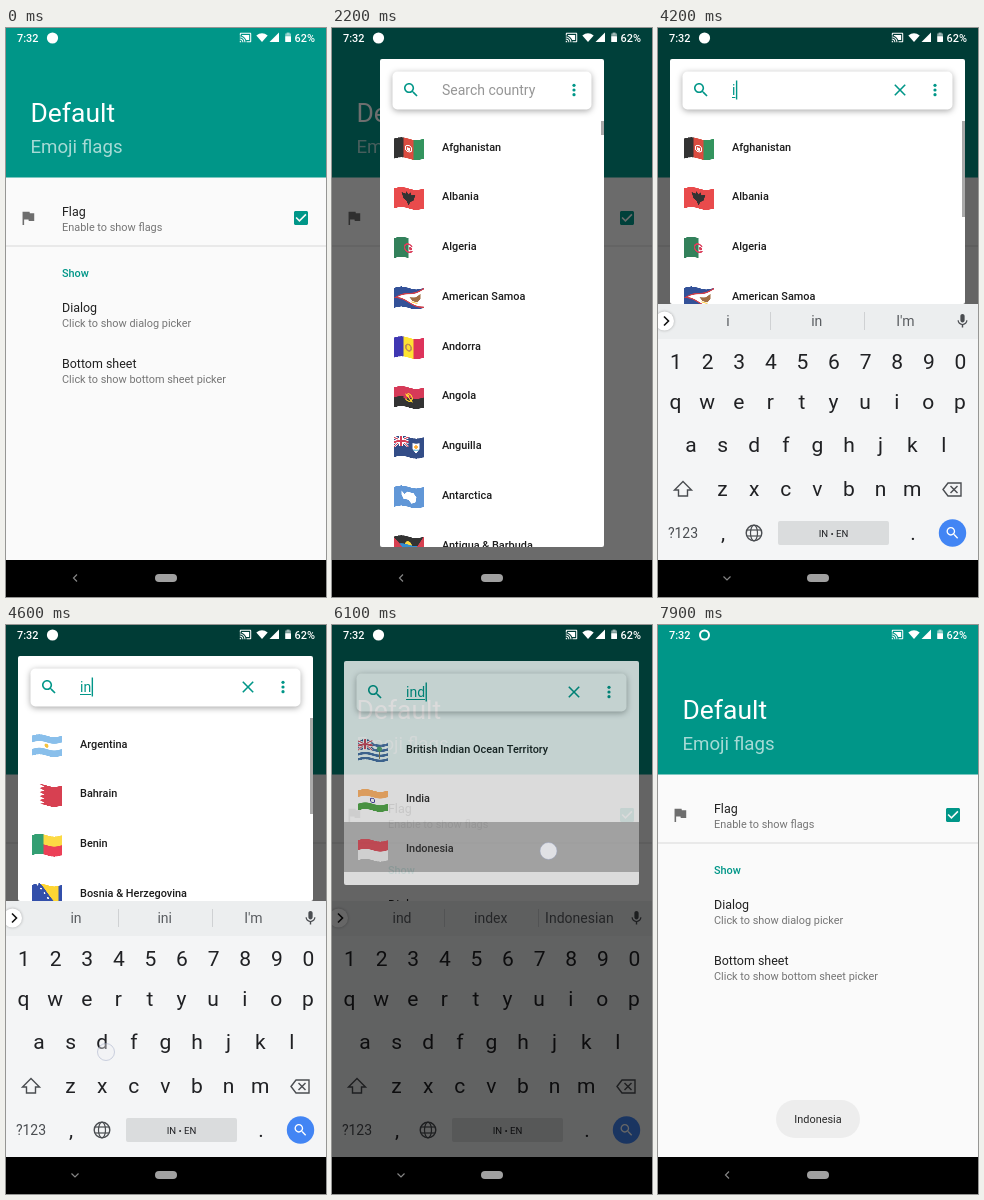
Animation, 320 px wide and 569 px high, one loop 8 s. Source, as an HTML page with a canvas:

```html
<!DOCTYPE html>
<html lang="en">
<head>
<meta charset="utf-8">
<title>Country picker</title>
<style>
html, body { margin: 0; width: 100%; height: 100%; overflow: hidden; background: #000; }
canvas { display: block; width: 320px; height: 569px; }
</style>
</head>
<body>
<canvas></canvas>
<script>
const W = 320, H = 569, LOOP = 8000, TEAL = '#009688';
const dpr = window.devicePixelRatio || 1;

function surface(w, h, scale, canvas = document.createElement('canvas')) {
  canvas.width = Math.round(w * scale);
  canvas.height = Math.round(h * scale);
  const ctx = canvas.getContext('2d');
  ctx.scale(scale, scale);
  return ctx;
}
const screen2d = surface(W, H, dpr, document.querySelector('canvas'));
const buffer = surface(W, H, dpr);
let g = screen2d, t = 0;

// --- helpers -------------------------------------------------------------
const ramp = (a, b) => Math.min(1, Math.max(0, (t - a) / (b - a)));
const during = (a, b) => t >= a && t < b;

function rect(x, y, w, h, color, r = 0) {
  g.fillStyle = color;
  g.beginPath();
  g.roundRect(x, y, w, h, r);
  g.fill();
}
function disc(x, y, r, color) {
  g.fillStyle = color;
  g.beginPath();
  g.arc(x, y, r, 0, 7);
  g.fill();
}
function trace(pts, close) {
  g.beginPath();
  for (let i = 0; i < pts.length; i += 2) g.lineTo(pts[i], pts[i + 1]);
  if (close) g.closePath();
}
function poly(color, ...pts) {
  trace(pts);
  g.fillStyle = color;
  g.fill();
}
function line(color, width, pts, close) {
  trace(pts, close);
  g.strokeStyle = color;
  g.lineWidth = width;
  g.stroke();
}
function ring(x, y, rx, ry, color, width) {
  g.strokeStyle = color;
  g.lineWidth = width;
  g.beginPath();
  g.ellipse(x, y, rx, ry, 0, 0, 7);
  g.stroke();
}
function text(s, x, y, size, color, weight = 400, align = 'left') {
  g.font = `${weight} ${size}px Roboto, sans-serif`;
  g.textAlign = align;
  g.fillStyle = color;
  g.fillText(s, x, y);
}
function icon(path, cx, cy, color, size = 18.67) {
  g.save();
  g.translate(cx - size / 2, cy - size / 2);
  g.scale(size / 24, size / 24);
  g.fillStyle = color;
  g.fill(new Path2D(path));
  g.restore();
}
function clipped(x, y, w, h, paint) {
  g.save();
  g.beginPath();
  g.rect(x, y, w, h);
  g.clip();
  paint();
  g.restore();
}
// Paints a group and blends it as one sheet.
function layer(alpha, paint, dy = 0, scale = 1) {
  if (alpha <= 0) return;
  const below = g;
  g = buffer;
  g.clearRect(0, 0, W, H);
  paint();
  g = below;
  g.save();
  g.globalAlpha = alpha;
  g.translate(W / 2, H / 2 + dy);
  g.scale(scale, scale);
  g.drawImage(buffer.canvas, -W / 2, -H / 2, W, H);
  g.restore();
}
function ripple(x, y, w, h, cx, cy, p, alpha) {
  clipped(x, y, w, h, () => {
    rect(x, y, w, h, `rgba(0,0,0,${alpha * 0.35 * p})`);
    disc(cx, cy, 20 + 300 * p, `rgba(0,0,0,${alpha * 0.7})`);
  });
}

const ICON = {
  flag: 'M14.4 6L14 4H5v17h2v-7h5.6l.4 2h7V6z',
  check: 'M19 3H5c-1.11 0-2 .9-2 2v14c0 1.1.89 2 2 2h14c1.11 0 2-.9 2-2V5c0-1.1-.89-2-2-2zm-9 14l-5-5 1.41-1.41L10 14.17l7.59-7.59L19 8l-9 9z',
  search: 'M15.5 14h-.79l-.28-.27C15.41 12.59 16 11.11 16 9.5 16 5.91 13.09 3 9.5 3S3 5.91 3 9.5 5.91 16 9.5 16c1.61 0 3.09-.59 4.23-1.57l.27.28v.79l5 4.99L20.49 19l-4.99-5zm-6 0C7.01 14 5 11.99 5 9.5S7.01 5 9.5 5 14 7.01 14 9.5 11.99 14 9.5 14z',
  mic: 'M12 14c1.66 0 3-1.34 3-3V5c0-1.66-1.34-3-3-3S9 3.34 9 5v6c0 1.66 1.34 3 3 3zm5.3-3c0 3-2.54 5.1-5.3 5.1S6.7 14 6.7 11H5c0 3.41 2.72 6.23 6 6.72V21h2v-3.28c3.28-.48 6-3.3 6-6.72h-1.7z',
  cast: 'M21 3H3c-1.1 0-2 .9-2 2v3h2V5h18v14h-7v2h7c1.1 0 2-.9 2-2V5c0-1.1-.9-2-2-2zM1 18v3h3c0-1.66-1.34-3-3-3zm0-4v2c2.76 0 5 2.24 5 5h2c0-3.87-3.13-7-7-7zm0-4v2c4.97 0 9 4.03 9 9h2c0-6.08-4.93-11-11-11zM19 7H5v1.6c4 1.3 7.1 4.4 8.4 8.4H19z'
};

// --- flags, drawn flat on 30 x 20 and then waved --------------------------
const columns = (...c) => c.forEach((k, i) => rect(i * 30 / c.length, 0, 30 / c.length + 0.1, 20, k));
const rows = (...c) => c.forEach((k, i) => rect(0, i * 20 / c.length, 30, 20 / c.length + 0.1, k));
function ensign() {
  clipped(0, 0, 15, 10, () => {
    rect(0, 0, 15, 10, '#012169');
    for (const [c, w] of [['#fff', 2.4], ['#c8102e', 0.9]]) {
      line(c, w, [0, 0, 15, 10]);
      line(c, w, [0, 10, 15, 0]);
    }
    for (const [c, w] of [['#fff', 3.6], ['#c8102e', 2]]) {
      line(c, w, [7.5, 0, 7.5, 10]);
      line(c, w, [0, 5, 15, 5]);
    }
  });
}
const FLAGS = {
  'Afghanistan'() { columns('#000', '#d32011', '#007a36'); ring(15, 10, 3.2, 3.2, '#fff', 1); rect(13.7, 9, 2.6, 3, '#fff'); },
  'Albania'() {
    rows('#e41e20');
    poly('#000', 15, 6, 17, 3.5, 18, 6, 22, 5, 20, 11, 17, 13, 15, 17, 13, 13, 10, 11, 8, 5, 12, 6, 13, 3.5);
  },
  'Algeria'() { columns('#006233', '#fff'); ring(15, 10, 4, 4, '#d21034', 1.5); rect(17, 8, 4, 4, '#fff'); disc(17, 10, 1.6, '#d21034'); },
  'American Samoa'() {
    rows('#00267f');
    poly('#bd1021', 30, 0, 0, 10, 30, 20);
    poly('#fff', 30, 1.5, 4, 10, 30, 18.5);
    poly('#8a4b16', 16, 9, 22, 8, 27, 5, 27, 10, 24, 13, 19, 12);
    line('#ffc221', 1, [18, 13, 24, 14]);
  },
  'Andorra'() { columns('#10069f', '#fedd00', '#d50032'); ring(15, 10, 2.7, 3.2, '#b5742a', 1.5); },
  'Angola'() { rows('#cc092f', '#000'); ring(15, 10, 3.7, 3.7, '#ffcb00', 1.1); rect(10, 6, 4, 6, '#cc092f'); line('#ffcb00', 1.2, [12, 7, 19, 14]); disc(14, 8.5, 1.4, '#ffcb00'); },
  'Anguilla'() { rows('#012169'); ensign(); poly('#fff', 19, 5, 26, 5, 26, 11, 22.5, 15, 19, 11); disc(22.5, 8.5, 1.8, '#ff9800'); rect(20, 11, 5, 1.5, '#5bb8d4'); },
  'Antarctica'() { rows('#3a7dce'); poly('#fff', 8, 5, 11, 8, 14, 5, 20, 5, 23, 9, 22, 14, 18, 16, 15, 13, 10, 13, 8, 9); },
  'Antigua & Barbuda'() {
    rows('#000', '#000', '#0072c6', '#fff', '#fff');
    disc(15, 8, 3.3, '#fcd116');
    rect(9, 8, 12, 4, '#0072c6');
    poly('#ce1126', 0, 0, 15, 20, 0, 20);
    poly('#ce1126', 30, 0, 15, 20, 30, 20);
  },
  'Argentina'() { rows('#6cb0e6', '#fff', '#6cb0e6'); disc(15, 10, 2, '#f6b40e'); },
  'Bahrain'() {
    rows('#ce1126');
    const teeth = [0, 0];
    for (let i = 0; i <= 10; i++) teeth.push(i % 2 ? 13 : 8, i * 2);
    poly('#fff', ...teeth, 0, 20);
  },
  'Benin'() { rows('#fcd116', '#e8112d'); rect(0, 0, 12, 20, '#008751'); },
  'Bosnia & Herzegovina'() {
    rows('#002395');
    poly('#fecb00', 9, 0, 27, 0, 27, 20);
    for (let i = 0; i < 6; i++) disc(6 + i * 3.5, 1 + i * 3.9, 0.9, '#fff');
  },
  'British Indian Ocean Territory'() {
    rows('#fff', '#234a91', '#fff', '#234a91', '#fff', '#234a91', '#fff', '#234a91');
    ensign();
    line('#7a5a2c', 1.2, [22, 8, 22, 17]);
    disc(22, 7, 2.6, '#2e8b4a');
  },
  'India'() { rows('#ff9933', '#fff', '#138808'); ring(15, 10, 2.2, 2.2, '#000080', 0.8); },
  'Indonesia'() { rows('#e32636', '#fff'); }
};
const waved = {};
for (const name in FLAGS) {
  const flat = g = surface(30, 20, 4);
  FLAGS[name]();
  const out = waved[name] = surface(30, 23, 4);
  for (let x = 0; x < 30; x += 0.5) {
    const y = 1.5 - 1.4 * Math.sin(x / 30 * 2 * Math.PI);
    out.drawImage(flat.canvas, x * 4, 0, 2, 80, x, y, 0.5, 20);
  }
}

const ALL = Object.keys(FLAGS).slice(0, 9);
const LIST_IN = ['Argentina', 'Bahrain', 'Benin', 'Bosnia & Herzegovina'];
const LIST_IND = ['British Indian Ocean Territory', 'India', 'Indonesia'];

// --- screens ---------------------------------------------------------------
function home() {
  rect(0, 0, W, 532, '#fafafa');
  rect(0, 0, W, 149.5, TEAL);
  text('Default', 24.5, 93.5, 26.45, '#fff');
  text('Emoji flags', 24.5, 124.5, 18.67, 'rgba(255,255,255,.65)');
  icon(ICON.flag, 22, 190, '#6e6e6e');
  icon(ICON.check, 295, 190, TEAL);
  rect(0, 217.5, W, 1, '#d9d9d9');
  text('Show', 56, 248.5, 10.9, TEAL, 500);
  if (during(1200, 2200)) ripple(0, 258, W, 56.5, 160, 286, ramp(1100, 1600), 0.145);
  const items = [['Flag', 'Enable to show flags', 188], ['Dialog', 'Click to show dialog picker', 284],
    ['Bottom sheet', 'Click to show bottom sheet picker', 340.3]];
  for (const [title, hint, y] of items) {
    text(title, 56, y, 12.45, '#212121');
    text(hint, 56, y + 15, 10.9, '#757575');
  }
}

function dialog(x, y, w, h, list, query) {
  rect(x, y, w, h, '#fff', 2);
  g.save();
  g.shadowColor = 'rgba(0,0,0,.35)';
  g.shadowBlur = 6 * dpr;
  g.shadowOffsetY = 1.5 * dpr;
  rect(x + 12.5, y + 12.5, w - 25, 38, '#fff', 5);
  g.restore();

  const mid = y + 31, left = x + 62;
  icon(ICON.search, x + 31, mid, TEAL);
  for (const d of [-4.7, 0, 4.7]) disc(x + w - 30, mid + d, 1.6, TEAL);
  let caret = left + 0.5;
  if (query) {
    text(query, left, mid + 5, 14, TEAL);
    const width = g.measureText(query).width;
    rect(left, mid + 7, width, 1, TEAL);
    caret = left + width + 0.5;
    const cx = x + w - 65;
    line(TEAL, 1.6, [cx - 5.2, mid - 5.2, cx + 5.2, mid + 5.2]);
    line(TEAL, 1.6, [cx - 5.2, mid + 5.2, cx + 5.2, mid - 5.2]);
  } else text('Search country', left, mid + 5, 14, '#969696');
  if (t >= 3200 && !during(5300, 5800)) rect(caret, mid - 9.5, 1.4, 19, TEAL);

  clipped(x, y + 56, w, h - 56, () => {
    if (list === LIST_IND && t >= 5700) ripple(x, y + 161, w, 50, 216, 226, ramp(5600, 6000), 0.3);
    list.forEach((name, i) => {
      const cy = y + 87.7 + i * 49.75;
      g.globalAlpha = 0.8;
      g.drawImage(waved[name].canvas, x + 13.5, cy - 9.5, 30, 23);
      g.globalAlpha = 1;
      text(name, left, cy + 3.9, 10.9, '#1c1c1c', 500);
    });
    if (list !== LIST_IND) rect(x + w - 3, y + 62, 3, query ? 96 : 14, '#aaa');
  });
}

function picker() {
  if (t < 4100) dialog(48, 31, 224, 488, ALL, '');
  else if (t < 4400) dialog(12, 31, 295, 245, ALL, 'i');
  else if (t < 4900) dialog(12, 31, 295, 245, LIST_IN, t < 4800 ? 'in' : 'ind');
  else dialog(12, 36, 295, 224, LIST_IND, 'ind');
}

function keyboard() {
  const ink = '#202124', grey = '#4a4d51';
  rect(0, 276, W, 293, '#f4f5f6');
  rect(0, 276, W, 35, '#eceeef');
  g.save();
  g.shadowColor = 'rgba(0,0,0,.3)';
  g.shadowBlur = 3 * dpr;
  disc(6.5, 293, 9.5, '#fff');
  g.restore();
  line('#111', 1.6, [6, 288.5, 10.5, 293, 6, 297.5]);
  const words = t < 4100 ? ['ini', 'di', 'saya'] : t < 4400 ? ['i', 'in', "I'm"]
    : t < 4800 ? ['in', 'ini', "I'm"] : ['ind', 'index', 'Indonesian'];
  words.forEach((s, i) => text(s, 70 + i * 88.7, 298, 14, '#5a5d61', 400, 'center'));
  for (const x of [112, 206]) rect(x, 284, 1, 18, '#cfd1d3');
  icon(ICON.mic, 304.5, 293, grey, 17);

  const keys = [['1234567890', 18, 340.5], ['qwertyuiop', 17.5, 380.5], ['asdfghjkl', 33, 424], ['zxcvbnm', 64.5, 468]];
  for (const [row, x, y] of keys)
    [...row].forEach((c, i) => text(c, x + i * 31.6, y, 21, ink, 400, 'center'));

  line(grey, 1.4, [25, 453.5, 33.5, 462, 29.5, 462, 29.5, 468, 20.5, 468, 20.5, 462, 16.5, 462], true);
  line(grey, 1.4, [285, 461.5, 290, 455, 303, 455, 303, 468, 290, 468], true);
  line(grey, 1.4, [292.5, 458, 299.5, 465]);
  line(grey, 1.4, [292.5, 465, 299.5, 458]);
  text('?123', 25, 510, 14, grey, 400, 'center');
  text(',', 65, 512, 21, ink, 400, 'center');
  text('.', 255, 512, 21, ink, 400, 'center');
  ring(96, 505, 7.8, 7.8, grey, 1.4);
  ring(96, 505, 3.5, 7.8, grey, 1.2);
  for (const y of [502, 508]) line(grey, 1.2, [89, y, 103, y]);
  rect(120, 493, 111, 24, '#dadcdd', 2);
  text('IN • EN', 175.5, 508.5, 9.6, ink, 400, 'center');
  disc(294.5, 505, 13.7, '#4285f4');
  icon(ICON.search, 294.5, 505, '#fff', 16);
}

function dim(alpha) {
  rect(0, 0, W, 532, `rgba(0,0,0,${alpha})`);
}

function statusBar() {
  text('7:32', 11, 13.8, 10.9, '#fff', 500);
  const solid = t < 1000 || during(2000, 3100) || during(4000, 5000) || during(6000, 7100);
  if (solid) disc(46.5, 10, 5.6, '#fff');
  else ring(46.5, 10, 4.5, 4.5, '#fff', 2);
  icon(ICON.cast, 239.5, 9.5, '#fff', 12.5);
  g.fillStyle = '#fff';
  g.fill(new Path2D('M256 14L250.300 7.500Q256 3 261.700 7.500Z'));
  poly('#fff', 263.5, 14, 273, 4.5, 273, 14);
  rect(280.6, 4.5, 3, 2, 'rgba(255,255,255,.5)');
  rect(279.2, 5.5, 5.8, 3.4, 'rgba(255,255,255,.5)');
  rect(279.2, 8.2, 5.8, 5.8, '#fff', 0.6);
  text('62%', 288.5, 13.8, 10.9, '#fff', 500);
}

function navKeys() {
  const typing = during(3500, 6300);
  line('#858585', 1.2, typing ? [65.5, 548.5, 69, 552, 72.5, 548.5] : [71, 546.5, 67.5, 550, 71, 553.5]);
  rect(149, 546, 22, 8, '#a0a0a0', 4);
}

function pointer() {
  const touches = [[1200, 1300, 160, 286], [3100, 3300, 150, 62], [4000, 4100, 239, 374],
    [4300, 4400, 223, 461], [4500, 4700, 100, 427], [5600, 6200, 216.5, 226]];
  for (const [a, b, x, y] of touches) if (during(a, b)) {
    disc(x, y, 8.5, `rgba(240,241,246,${a === 5600 ? 0.8 : 0.4})`);
    ring(x, y, 8.5, 8.5, 'rgba(150,160,190,.45)', 1);
  }
}

function toast() {
  rect(118, 475, 84, 38, '#ededed', 19);
  text('Indonesia', 160, 498, 10.9, '#2a2a2a', 400, 'center');
}

function draw() {
  const opened = ramp(1900, 2200), closing = ramp(6100, 6400);
  const keysIn = ramp(3300, 3800), keysOut = ramp(6100, 6400);
  const showKeys = () => layer(Math.min(1, keysIn * 1.28) * (1 - keysOut), () => {
    clipped(0, 276, W, 256, keyboard);
  }, 55 * (1 - keysIn) + 55 * keysOut);
  const shade = (t < 4000 ? 0.57 : 0.6) * opened * (1 - closing);

  rect(0, 0, W, H, '#000');
  home();
  // While closing, the shade lies above the keyboard.
  if (t >= 6100) showKeys();
  dim(shade);
  layer(opened * (1 - ramp(6040, 6300)), picker, 0, 0.9 + 0.1 * opened);
  if (t < 6100) showKeys();
  layer(ramp(6300, 6700), toast);
  navKeys();
  statusBar();
  pointer();
}

function tick(now) {
  t = Math.floor(now % LOOP / 100) * 100;
  g = screen2d;
  draw();
  requestAnimationFrame(tick);
}
requestAnimationFrame(tick);
</script>
</body>
</html>
```
